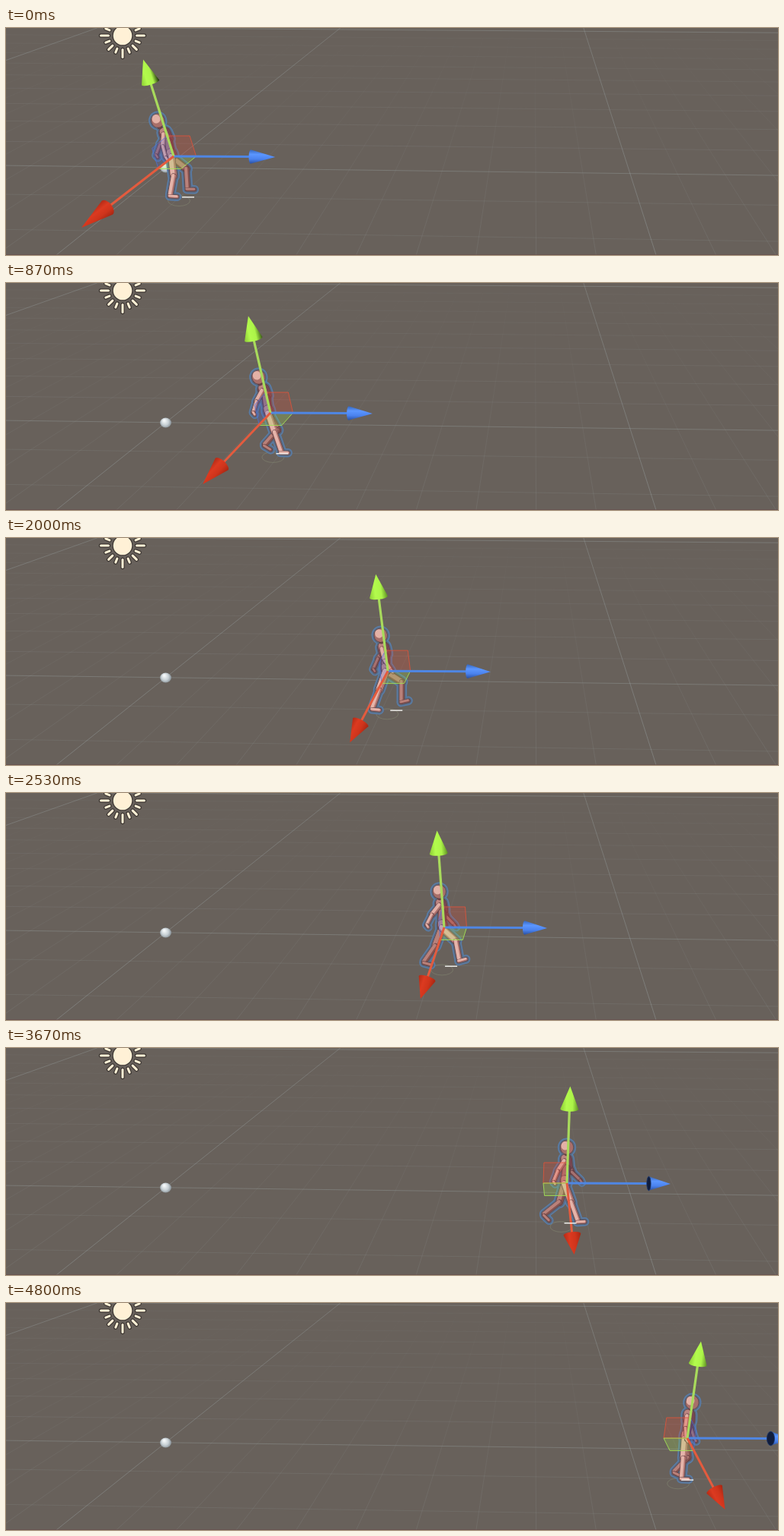
An HTML page with a canvas that plays this animation: 1013 by 299 pixels, repeating every 4.87 s.

```html
<!DOCTYPE html>
<html lang="en">
<head>
<meta charset="utf-8">
<title>Walking figure with move handles</title>
<style>
html, body { margin: 0; width: 1013px; height: 299px; overflow: hidden; background: #68615b; }
canvas { display: block; }
</style>
</head>
<body>
<canvas id="stage" width="1013" height="299"></canvas>
<script>
const W = 1013, H = 299, LOOP = 4870, STEP = 200 / 3;
const ctx = document.getElementById('stage').getContext('2d');

// [step, value] keys, linear in between
const PATH_X = [[0, 220], [8, 298], [13, 347], [16, 368], [23, 435], [32, 520],
  [38, 575], [48, 670], [55, 736], [63, 810], [72, 894]];
const PATH_Y = [[0, 170.2], [13, 172.3], [23, 174.1], [38, 175.6], [55, 176.9], [63, 180.5], [72, 179.9]];
const STRIDE = [[0, .65], [13, 2.36], [23, 3.82], [38, 5.87], [55, 8.16], [63, 9.24], [72, 10.44]];
const FOOT_TILT = [[0, -.3], [.2, 0], [.8, .1], [1.1, .9], [1.4, .55], [1.8, -.3], [2, -.3]];

function at(keys, k) {
  for (let i = 1; i < keys.length; i++) {
    const [a, u] = keys[i - 1], [b, v] = keys[i];
    if (k <= b) return u + (v - u) * (k - a) / (b - a);
  }
  return keys[keys.length - 1][1];
}

function line(c, x1, y1, x2, y2, color, w) {
  c.strokeStyle = color;
  c.lineWidth = w;
  c.beginPath();
  c.moveTo(x1, y1);
  c.lineTo(x2, y2);
  c.stroke();
}

function oval(c, x, y, rx, ry, fill, stroke, w = 1) {
  c.beginPath();
  c.ellipse(x, y, rx, ry, 0, 0, 7);
  if (fill) { c.fillStyle = fill; c.fill(); }
  if (stroke) { c.strokeStyle = stroke; c.lineWidth = w; c.stroke(); }
}

function drawScene(c) {
  c.fillStyle = '#68615b';
  c.fillRect(0, 0, W, H);
  const vx = 693, vy = -204, ink = a => `rgba(165,178,180,${a})`;
  for (let i = -14; i <= 22; i++) {
    const x = 66 + 78.7 * i, major = i % 10 === 0;
    const t = -vy / (H - vy);
    const g = c.createLinearGradient(0, 0, 0, H);
    g.addColorStop(0, ink(major ? .27 : 0));
    g.addColorStop(.2, ink(major ? .3 : .025));
    g.addColorStop(1, ink(major ? .34 : .13));
    line(c, vx + (x - vx) * t, 0, x, H, g, 1);
  }
  for (let j = -2; j <= 10; j++) {
    const y = 1 / (.002554 + .000229 * j) + vy;
    const slope = .0073 + y * .00003;
    const alpha = j % 10 === 0 ? .3 : .12 - Math.max(j, 0) * .008;
    line(c, 0, y - 500 * slope, W, y + 513 * slope, ink(alpha), 1);
  }
  c.fillStyle = 'rgba(104,76,76,.6)';
  c.fillRect(0, 298, W, 1);
  drawSun(c, 153, 10);
  drawBall(c, 209.5, 184);
}

function drawSun(c, x, y) {
  c.lineCap = 'round';
  for (const [color, grow] of [['rgba(50,46,42,.85)', 2.4], ['#fff1d6', 0]]) {
    for (let i = 0; i < 16; i++) {
      const a = i * Math.PI / 8, r = i % 4 === 0 ? 28.5 : i % 2 ? 24 : 26;
      const dx = Math.cos(a), dy = Math.sin(a);
      line(c, x + dx * 18.5, y + dy * 18.5, x + dx * r, y + dy * r, color, 3 + grow);
    }
    oval(c, x, y, 12.3 + grow / 2, 12.3 + grow / 2, color);
  }
  c.lineCap = 'butt';
}

function drawBall(c, x, y) {
  const g = c.createRadialGradient(x - 2, y - 3, 1, x, y, 8);
  g.addColorStop(0, '#f4f7f8');
  g.addColorStop(.55, '#c5ced3');
  g.addColorStop(1, '#7d868c');
  oval(c, x, y, 7.5, 6.5, g);
}

const scene = document.createElement('canvas');
scene.width = W;
scene.height = H;
drawScene(scene.getContext('2d'));

function pose(k) {
  const s = at(STRIDE, k), x = at(PATH_X, k), d = x - 220;
  return {
    s, x, d,
    y: at(PATH_Y, k) + 2 * Math.cos(2 * Math.PI * s),
    up: [-40 + .086 * d, -127.5],
    side: [-121 + .253 * d, 94],
    gx: x + 17 - .028 * d,
    gy: 222.5 + .0153 * d
  };
}

// Two equal bones from a to b; bend picks the side of the joint
function joint(a, b, len, bend) {
  const dx = b[0] - a[0], dy = b[1] - a[1], dist = Math.hypot(dx, dy) || 1;
  const off = Math.sqrt(Math.max(0, len * len - dist * dist / 4)) * bend / dist;
  return [a[0] + dx / 2 + dy * off, a[1] + dy / 2 - dx * off];
}

function figure(p) {
  const parts = [];
  const tilt = p.up[0] / 127.5;
  const spot = (a, h) => [p.x + a + tilt * h, p.y - h];
  const bone = (a, b, w, color, lit) => parts.push({ a, b, w, color, lit });

  function leg(theta, near) {
    theta %= 2;
    const u = theta - 1, c = Math.cos(Math.PI * theta);
    const lift = u > 0 ? (4 + 5 * Math.abs(c)) * Math.sqrt(Math.sin(Math.PI * u)) : 0;
    const color = near ? '#b57872' : '#875450', lit = near ? '#e5b4aa' : '#b9817a';
    const hip = spot(-3, -1);
    const ankle = [p.gx - 10 + 25 * c, p.gy - (near ? 3 : 6) - lift];
    const knee = joint(hip, ankle, 25, 1);
    const r = at(FOOT_TILT, theta), dx = Math.cos(r), dy = Math.sin(r);
    bone(hip, knee, 9, color, lit);
    bone(knee, ankle, 6.5, color, lit);
    bone([ankle[0] - dx, ankle[1] + 2], [ankle[0] + 9 * dx, ankle[1] + 2 + 9 * dy], 4.5, color, lit);
  }

  function arm(swing, near) {
    const color = near ? '#a9706c' : '#774950', lit = near ? '#e2afa6' : '#a67270';
    const sh = spot(near ? -4 : 0, 29);
    const turn = .55 * swing - .12 + tilt * .6, fore = turn + .2 + .25 * Math.max(0, swing);
    const el = [sh[0] + 16 * Math.sin(turn), sh[1] + 16 * Math.cos(turn)];
    const hand = [el[0] + 15 * Math.sin(fore), el[1] + 15 * Math.cos(fore)];
    bone(sh, el, 6.5, color, lit);
    bone(el, hand, 5, color, lit);
    bone(hand, [hand[0] + 2, hand[1] + 3], 4, color, lit);
  }

  const swing = Math.cos(Math.PI * p.s), headX = -6 + .0085 * p.d;
  arm(swing, false);
  leg(p.s + 1, false);
  bone(spot(-2, 31), spot(-1, 23), 15, '#774751', '#bd8580');
  bone(spot(-1, 19), spot(-2, 9), 11, '#6b414e', '#a87475');
  bone(spot(-2, 4), spot(-2, 1), 13, '#7a4b57', '#c18c87');
  leg(p.s, true);
  bone(spot(headX, 39), spot(headX, 42), 6, '#6d4346', '#95645f');
  arm(-swing, true);
  bone(spot(headX, 46.5), spot(headX, 47.5), 17, '#a86f69', '#e3b1a6');
  return parts;
}

function drawFigure(p) {
  const parts = figure(p);
  ctx.lineCap = 'round';
  const pass = (grow, color) => {
    for (const { a, b, w } of parts) line(ctx, a[0], a[1], b[0], b[1], color, w + grow);
  };
  pass(7, '#587da9');
  pass(4, '#5c687b');
  for (const { a, b, w, color, lit } of parts) {
    line(ctx, a[0], a[1], b[0], b[1], '#5a3a40', w + .6);
    line(ctx, a[0], a[1], b[0], b[1], color, w - .4);
    const o = w * .13;
    line(ctx, a[0] - o, a[1] - o, b[0] - o, b[1] - o, lit, w * .62);
  }
  ctx.lineCap = 'butt';
}

function quad(p, a, b, fill, stroke) {
  ctx.beginPath();
  ctx.moveTo(p.x, p.y);
  ctx.lineTo(p.x + a[0], p.y + a[1]);
  ctx.lineTo(p.x + a[0] + b[0], p.y + a[1] + b[1]);
  ctx.lineTo(p.x + b[0], p.y + b[1]);
  ctx.closePath();
  ctx.fillStyle = fill;
  ctx.fill();
  ctx.strokeStyle = stroke;
  ctx.lineWidth = 1;
  ctx.stroke();
}

// Cone from base to tip, with shades running across its width
function cone(base, tip, r, bulge, shades) {
  const len = Math.hypot(tip[0] - base[0], tip[1] - base[1]);
  ctx.save();
  ctx.translate(base[0], base[1]);
  ctx.rotate(Math.atan2(tip[1] - base[1], tip[0] - base[0]));
  const g = ctx.createLinearGradient(0, -r, 0, r);
  shades.forEach((c, i) => g.addColorStop(i / (shades.length - 1), c));
  ctx.fillStyle = g;
  ctx.beginPath();
  ctx.moveTo(len, 0);
  ctx.lineTo(0, r);
  ctx.ellipse(0, 0, bulge, r, 0, Math.PI / 2, Math.PI * 1.5);
  ctx.closePath();
  ctx.fill();
  ctx.restore();
}

function drawHandles(p) {
  const { x, y, d, up, side } = p;
  const on = (v, f) => [x + v[0] * f, y + v[1] * f];
  const away = x > 692;
  const fwd = [away ? -31 : 29.5, 0];
  const rise = [up[0] * .21, -27], out = [side[0] * .165, 16.5];

  quad(p, rise, out, 'rgba(70,95,215,.22)', 'rgba(75,115,225,.7)');
  quad(p, rise, fwd, 'rgba(226,72,52,.24)', 'rgba(222,84,58,.85)');
  quad(p, out, fwd, 'rgba(160,220,80,.24)', 'rgba(164,226,86,.9)');

  const g = on(up, .763), r = on(side, .72);
  const b = [x + 101 + .0125 * d, y + .5], bt = [x + 133.3 + .005 * d, y + 1];
  line(ctx, x, y, b[0], b[1], '#4f86e3', 3);
  line(ctx, x, y, g[0], g[1], '#a8da5c', 3.2);
  line(ctx, x, y, r[0], r[1], '#e35b3e', 3);

  const early = Math.max(0, 1 - d / 260);
  const greenEdge = `rgb(${92 - 70 * early},${142 - 105 * early},${34 - 24 * early})`;
  cone(g, on(up, 1), 12, 3, ['#8ccc35', '#b3fb4d', '#acf448', greenEdge]);
  cone(r, on(side, 1), 11.5, 3.5 + 3 * early, ['#a62713', '#cf341b', '#dc3a20', '#b32b16']);
  cone(b, bt, 9.3, 2.5, ['#3566bb', '#5b96ff', '#4a82ee', '#2a4f9e']);
  if (away) oval(ctx, b[0], b[1], 2 + (x - 692) * .015, 9.3, '#101d3d', '#1d3566', .8);
}

function draw(t) {
  const k = Math.min(72, Math.floor((t % LOOP + 3.4) / STEP));
  const p = pose(k);
  ctx.drawImage(scene, 0, 0);
  oval(ctx, p.gx - 10, p.gy + 5, 14.5, 7, null, 'rgba(142,150,122,.4)');
  drawFigure(p);
  drawHandles(p);
  line(ctx, p.gx - 6, p.gy + .3, p.gx + 10, p.gy + .3, '#f5f5f2', 1.4);
}

const start = performance.now();
function tick() {
  draw(performance.now() - start);
  requestAnimationFrame(tick);
}
tick();
</script>
</body>
</html>
```
